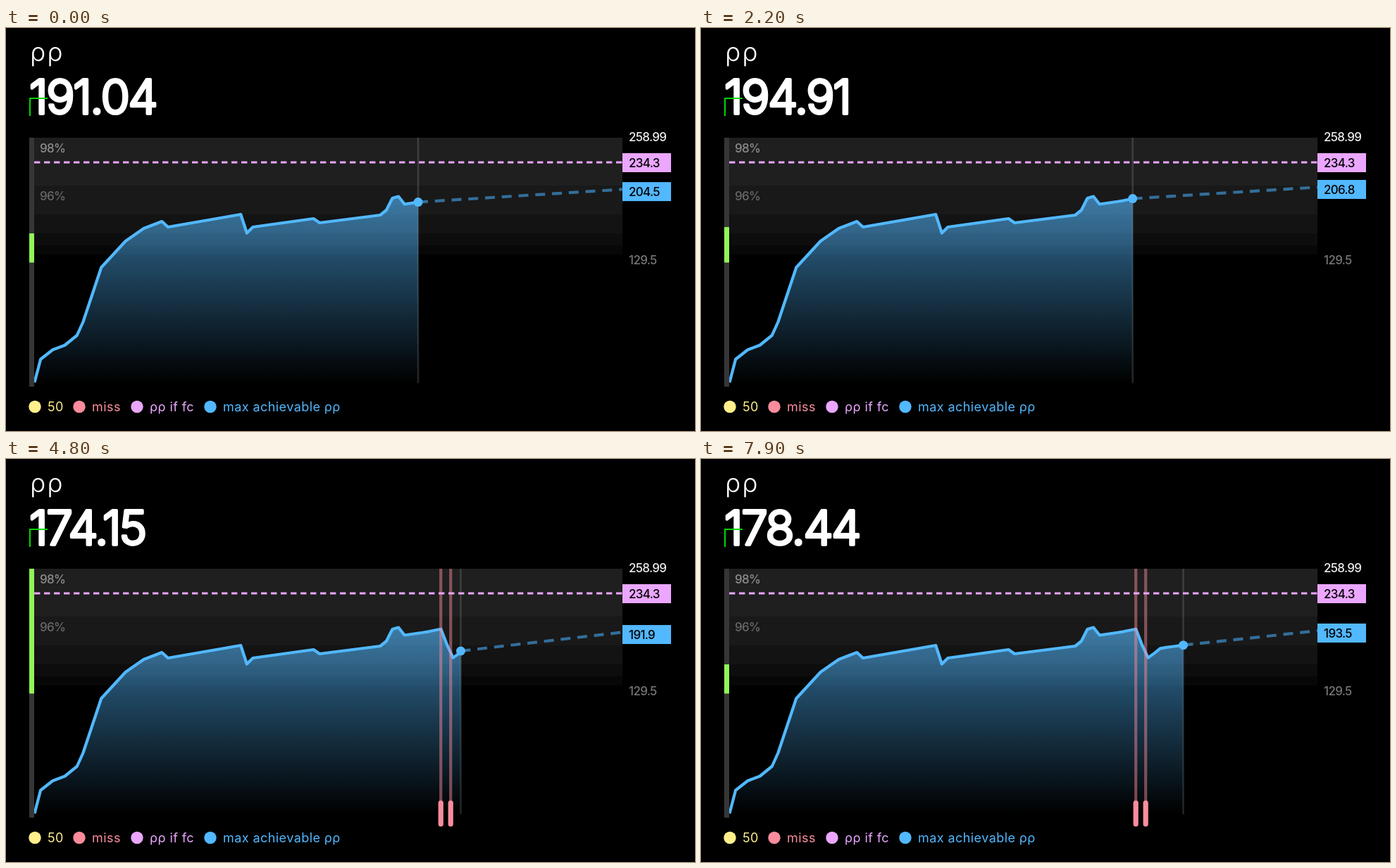
An HTML page with a canvas for the animation above (8000 ms loop, 978 by 573 pixels).

```html
<!DOCTYPE html>
<html lang="en">
<head>
<meta charset="utf-8">
<title>pp counter</title>
<style>
html, body { margin: 0; width: 100%; height: 100%; overflow: hidden; background: #000; }
canvas { display: block; width: 978px; height: 573px; }
</style>
</head>
<body>
<canvas id="stage" width="978" height="573"></canvas>
<script>
const ctx = document.getElementById('stage').getContext('2d');
const LOOP = 8000, STEP = 100, SPEED = 0.0126, LAG = 100;
const LEFT = 40, RIGHT = 875, TOP = 156, BOTTOM = 505;
const START_X = 585, FIRST_X = 40.5, GAP = 8.61, LIVE = 64;
const BLUE = '#52b8ff', PINK = '#eba6ff', ROSE = '#fa8c9c', YELLOW = '#fff08c', GREEN = '#91f558';
const MISSES = [{ x: 617.2, at: 2600 }, { x: 631.2, at: 3750 }];

// Corners of the curve drawn before the loop: [sample, height]
const past = [[0, 504], [1, 471], [3, 457.5], [5, 451], [7, 437], [8, 418], [11, 340.5], [15, 303],
  [18, 285], [21, 275], [22, 283], [34, 265], [35, 291.5], [36, 283], [46, 271], [47, 277],
  [57, 266], [58, 259], [59, 242], [60, 239.5], [61, 250.5]];

// Scores over time: [ms, value]
const ppKeys = [[0, 191.04], [900, 192.3], [2200, 194.91], [2570, 195.5], [2800, 178.5], [3600, 178.9],
  [3700, 174.29], [3800, 164.8], [4600, 170.2], [4800, 174.15], [5800, 175.86], [7900, 178.44]];
const maxKeys = [[0, 204.5], [2570, 207.2], [2800, 201.6], [3700, 201.7], [3850, 191.4],
  [5800, 192.5], [7900, 193.5]];

function valueAt(keys, t) {
  const i = Math.max(1, keys.findIndex(k => k[0] >= t));
  const [t0, a] = keys[i - 1], [t1, b] = keys[i];
  return a + (b - a) * Math.max(0, t - t0) / (t1 - t0);
}

const yOf = pp => TOP + (258.99 - pp) * 1.3475;
const curveY = t => yOf(valueAt(ppKeys, t - LAG));
const sampleX = i => FIRST_X + GAP * i;
const bump = (t, mid, width) => Math.exp(-(((t - mid) / width) ** 2));

function rect(x, y, w, h, color) {
  ctx.fillStyle = color;
  ctx.fillRect(x, y, w, h);
}

function disc(x, y, r, color) {
  ctx.fillStyle = color;
  ctx.beginPath();
  ctx.arc(x, y, r, 0, Math.PI * 2);
  ctx.fill();
}

function line(points, width, color, dash = []) {
  ctx.beginPath();
  points.forEach(p => ctx.lineTo(...p));
  ctx.setLineDash(dash);
  ctx.lineWidth = width;
  ctx.strokeStyle = color;
  ctx.stroke();
  ctx.setLineDash([]);
}

// The letter p is set as its round form without a spur
function text(str, x, y, size, color, weight = 400, spacing = 0, outline = 0) {
  const s = str.replace(/p/g, 'ρ');
  ctx.font = `${weight} ${size}px Inter, sans-serif`;
  ctx.letterSpacing = spacing * size + 'px';
  ctx.fillStyle = ctx.strokeStyle = color;
  ctx.fillText(s, x, y);
  if (outline) {
    ctx.lineWidth = outline;
    ctx.strokeText(s, x, y);
  }
}

const figure = (str, mid, color, x = 884) => text(str, x, mid + 6.2, 17, color, 500, -0.04);

function tag(value, mid, color) {
  rect(RIGHT, mid - 13.5, 69, 27, color);
  figure(value.toFixed(1), mid, '#000');
}

function backdrop() {
  const edges = [156, 224, 265, 292, 309, 322];
  for (let i = 0; i < 5; i++) {
    const tone = 31 - 6 * i;
    rect(LEFT, edges[i], RIGHT - LEFT, edges[i + 1] - edges[i], `rgb(${tone},${tone},${tone})`);
  }
  figure('98%', 171, '#8c8c8c', 48);
  figure('96%', 239, '#686868', 48);
  figure('258.99', 155, '#ececec');
  figure('129.5', 330, '#757575');
}

function curve(x, y) {
  const pts = past.map(([i, h]) => [sampleX(i), h]);
  for (let i = LIVE; sampleX(i) < x; i++) {
    pts.push([sampleX(i), curveY((sampleX(i) - START_X) / SPEED)]);
  }
  pts.push([x, y]);

  const shade = ctx.createLinearGradient(0, 239, 0, BOTTOM);
  shade.addColorStop(0, 'rgba(82,184,255,0.61)');
  shade.addColorStop(1, 'rgba(82,184,255,0)');
  ctx.beginPath();
  [...pts, [x, BOTTOM], [FIRST_X, BOTTOM]].forEach(p => ctx.lineTo(...p));
  ctx.fillStyle = shade;
  ctx.fill();
  line(pts, 4.2, BLUE);
}

function missMark(x) {
  rect(x - 2.1, TOP, 4.2, 331, 'rgba(250,140,156,0.48)');
  ctx.fillStyle = ROSE;
  ctx.beginPath();
  ctx.roundRect(x - 3.6, 485.5, 7.2, 37, 3.6);
  ctx.fill();
}

function legend() {
  [['50', 41, YELLOW], ['miss', 104, ROSE], ['pp if fc', 186, PINK],
    ['max achievable pp', 290, BLUE]].forEach(([label, x, color]) => {
    disc(x, 538.5, 8.7, color);
    text(label, x + 18, 545, 18, color, 400, 0.024);
  });
}

function draw(t) {
  const x = START_X + SPEED * t, y = curveY(t);
  const pp = valueAt(ppKeys, t), best = valueAt(maxKeys, t);
  rect(0, 0, 978, 573, '#000');
  ctx.lineJoin = 'round';

  text('pp', 34, 47, 37, '#fff', 300, 0.05);
  text(pp.toFixed(2), 33, 121.5, 67, '#fff', 300, -0.033, 4);
  if (t < 5700 || t >= 6000) line([[59, 100], [34, 100], [34, 125]], 2, '#00d800');

  backdrop();
  line([[x, y], [RIGHT, yOf(best)]], 4.2, '#346e99', [14, 9.8]);
  rect(x - 1.25, TOP, 2.5, BOTTOM - TOP, 'rgba(255,255,255,0.14)');
  curve(x, y);
  MISSES.filter(m => t >= m.at).forEach(m => missMark(m.x));
  line([[LEFT, 191], [RIGHT, 191]], 2.8, PINK, [8.4, 5.6]);
  disc(x, y, 6.5, BLUE);

  const gauge = 292 - 10 * bump(t, 2500, 900) - 136 * bump(t, 4800, 120);
  rect(33, TOP, 7, 354, '#363636');
  rect(33, gauge, 7, 333.5 - gauge, GREEN);

  tag(234.3, 191.5, PINK);
  tag(best, yOf(best) + 3.2, BLUE);
  legend();
}

const begin = performance.now();
function tick() {
  const t = (performance.now() - begin) % LOOP;
  draw(Math.floor(t / STEP) * STEP);
  requestAnimationFrame(tick);
}
tick();
</script>
</body>
</html>
```
